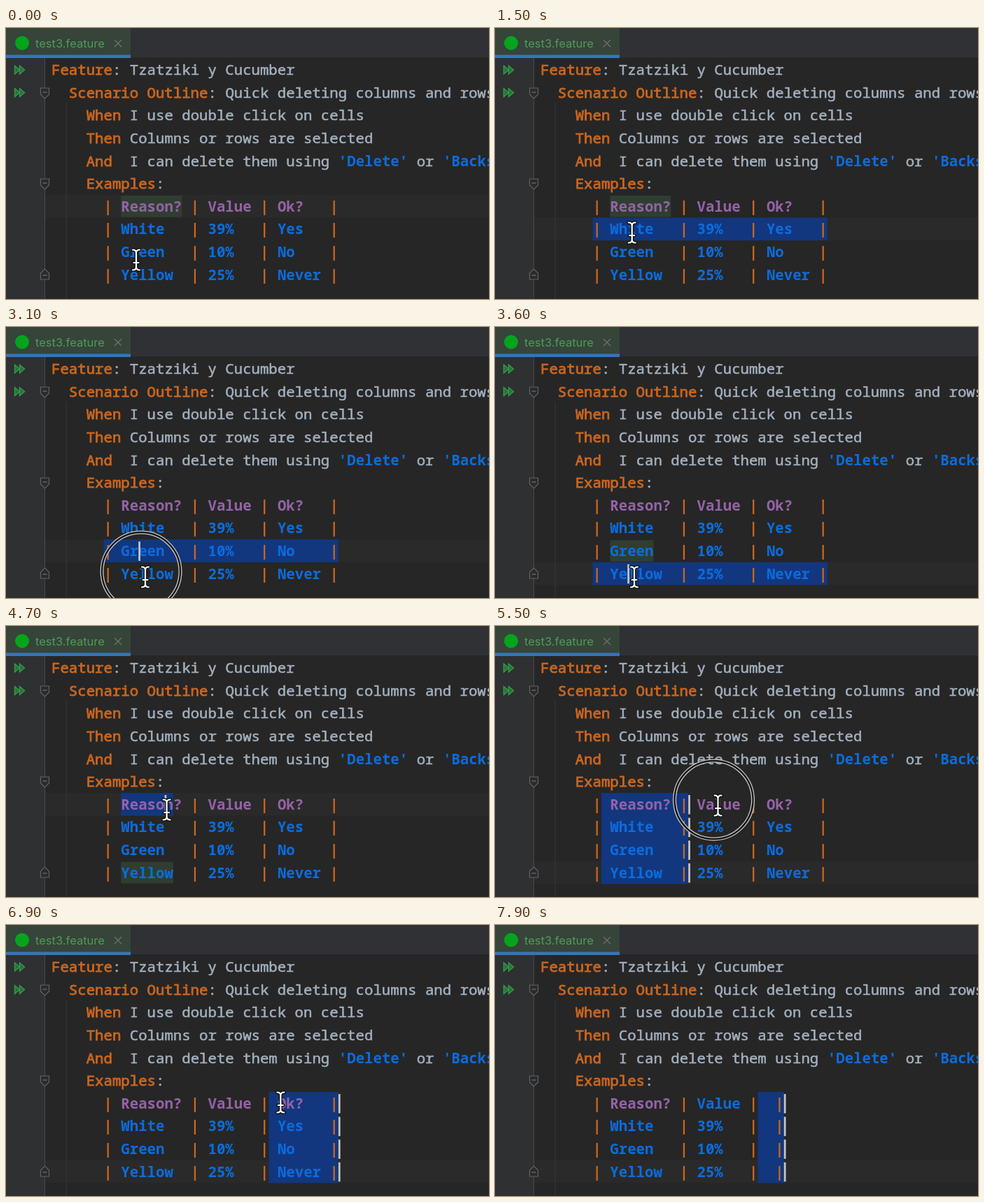
Write an HTML page that moves like this. It is 690 by 388 pixels and loops after 8 s.

```html
<!DOCTYPE html>
<html lang="en">
<head>
<meta charset="utf-8">
<title>Editor table columns</title>
<style>
html, body { margin: 0; width: 100%; height: 100%; overflow: hidden; background: #262626; }
svg { display: block; }
text { font: 500 20.7px "Noto Sans Mono", "DejaVu Sans Mono", monospace; white-space: pre; }
/* A thin outline stands in for the medium weights. */
.medium { stroke: currentColor; stroke-width: .55; }
.key { stroke: currentColor; stroke-width: .85; }
.bold { font-weight: 700; }
.tab { font: 400 16.5px Inter, "Open Sans", sans-serif; }
</style>
</head>
<body>
<svg id="stage" width="690" height="388" viewBox="0 0 690 388"></svg>
<script>
const stage = document.getElementById("stage");
const KEY = "#ca661f", TEXT = "#a3b0be", BLUE = "#0c6cdc", PURPLE = "#9463a6";
const CHAR = 12.42, LINE = 32.6, TABLE_TOP = 239;
const colX = c => 65 + c * CHAR;
const rowY = r => TABLE_TOP + r * LINE;

function add(parent, name, attrs = {}, content) {
  const el = document.createElementNS("http://www.w3.org/2000/svg", name);
  for (const k in attrs) el.setAttribute(k, attrs[k]);
  if (content !== undefined) el.textContent = content;
  parent.append(el);
  return el;
}
const rect = (parent, x, y, width, height, fill) => add(parent, "rect", { x, y, width, height, fill });
const path = (parent, d, attrs) => add(parent, "path", { d, fill: "none", ...attrs });
// Lines count from the top of the file; the table starts at line 6.
const word = (line, col, s, color, cls = "medium") => add(stage, "text",
  { x: colX(col), y: 67.2 + line * LINE, color, fill: "currentColor", class: cls }, s);

// Editor background, gutter and tab bar
rect(stage, 0, 0, 690, 388, "#262626");
rect(stage, 0, 43, 55, 345, "#2e3032");
const back = add(stage, "g");
rect(stage, 0, 0, 690, 42, "#2f3135");
rect(stage, 0, 0, 178, 39, "#36443a");
rect(stage, 0, 38.5, 178, 4.5, "#3676b8");
add(stage, "circle", { cx: 23, cy: 21.5, r: 10, fill: "#04a51c" });
add(stage, "text", { x: 42, y: 27.5, fill: "#4f9a58", class: "tab" }, "test3.feature");
path(stage, "M155 17l10 10m0-10l-10 10", { stroke: "#6b706d", "stroke-width": 1.4 });
path(stage, "M55.5 43V388", { stroke: "#484a4b" });
path(stage, "M86 107V388", { stroke: "#363636" });

for (const y of [60, 92.5])
  path(stage, `M12.5 ${y - 6}l7 6l-7 6zM19.5 ${y - 6}l7 6l-7 6z`,
    { stroke: "#35994a", "stroke-width": 1.4, fill: "#2a7039" });
for (const [y, dir] of [[93, 1], [223, 1], [353, -1]]) {
  path(stage, `M49.5 ${y - 7 * dir}h12v${9 * dir}l-6 ${6 * dir}l-6 ${-6 * dir}z`,
    { stroke: "#606263", "stroke-width": 1.2, fill: "#2a2b2c" });
  path(stage, `M52.5 ${y - dir}h6`, { stroke: "#707273", "stroke-width": 1.2 });
}

// Feature file
[[0, 0, "Feature", ":"], [1, 2, "Scenario Outline", ":"], [2, 4, "When"], [3, 4, "Then"],
 [4, 4, "And"], [5, 4, "Examples", ":"]].forEach(([line, col, s, colon]) => {
  word(line, col, s, KEY, "key");
  if (colon) word(line, col + s.length, colon, TEXT);
});
word(0, 9, "Tzatziki y Cucumber", TEXT);
word(1, 20, "Quick deleting columns and rows", TEXT);
word(2, 9, "I use double click on cells", TEXT);
word(3, 9, "Columns or rows are selected", TEXT);
word(4, 9, "I can delete them using", TEXT);
word(4, 33, "'Delete'", BLUE, "bold");
word(4, 42, "or", TEXT);
word(4, 45, "'Backspace'", BLUE, "bold");

const cells = ["Reason? Value Ok?", "White 39% Yes", "Green 10% No", "Yellow 25% Never"].map((row, r) =>
  row.split(" ").map((s, c) => word(6 + r, [8, 18, 26][c], s, r ? BLUE : PURPLE, "bold")));
const pipes = cells.map((_, r) => [6, 16, 24, 32].map(c => word(6 + r, c, "|", KEY, "bold")));

const front = add(stage, "g");
const ring = add(stage, "g");
add(ring, "circle", { r: 56, fill: "none", stroke: "#c9c9c9", "stroke-width": 5 });
add(ring, "circle", { r: 56, fill: "none", stroke: "#161616", "stroke-width": 2.4 });
const mouse = add(stage, "g");
const beam = "M-5-14.5Q0-14.5 0-10Q0-14.5 5-14.5M0-10V10M-5 14.5Q0 14.5 0 10Q0 14.5 5 14.5M-3.5 4H3.5";
path(mouse, beam, { stroke: "#111", "stroke-width": 5, "stroke-linecap": "round" });
path(mouse, beam, { stroke: "#fff", "stroke-width": 2.2, "stroke-linecap": "round" });

// at: start time, line: caret row, sel: [col, end col, row, rows],
// hl: [row, length] of the marked word, carets: [col, row, rows]
const column = (from, to) => ({ line: 3, sel: [from, to, 0, 4], carets: [to, 0, 4] });
const fullRow = r => ({ line: r, sel: [6, 33, r, 1] });
const states = [
  { at: 0, line: 0, hl: [0, 7] },
  { at: 1200, ...fullRow(1), hl: [0, 7] },
  { at: 1900, ...fullRow(1) },
  { at: 2400, ...fullRow(2), carets: [10, 2, 1] },
  { at: 3200, ...fullRow(3), hl: [2, 5], carets: [10, 3, 1] },
  { at: 4400, line: 0, hl: [3, 6], carets: [13, 0, 1] },
  { at: 4600, line: 0, hl: [3, 6], sel: [8, 14, 0, 1], carets: [13, 0, 1] },
  { at: 4800, ...column(7, 17) },
  { at: 5600, ...column(17, 25) },
  { at: 6900, ...column(25, 33) },
  { at: 7600, ...column(25, 28), deleted: true }
];
const clicks = [[900, 1200], [2150, 2450], [2950, 3250], [4300, 4600], [5350, 5650], [6600, 6900]];
const moves = [[0, 186, 332], [800, 195, 293], [1900, 196, 293], [2200, 197, 325], [2700, 197, 326],
  [3100, 199, 358], [3800, 199, 358], [4400, 229, 263], [4900, 230, 263], [5350, 318, 257],
  [5800, 320, 257], [6200, 392, 254], [8000, 393, 254]];

function mouseAt(t) {
  const i = moves.findIndex(m => m[0] > t);
  const [t0, x0, y0] = moves[i - 1], [t1, x1, y1] = moves[i];
  const p = (t - t0) / (t1 - t0), e = p * p * (3 - 2 * p);
  return [x0 + (x1 - x0) * e, y0 + (y1 - y0) * e];
}

function showState({ line, sel, hl, carets, deleted }) {
  back.replaceChildren();
  front.replaceChildren();
  rect(back, 56, rowY(line), 634, LINE, "#2a2a2a");
  if (hl) rect(back, colX(8), rowY(hl[0]) + 1, hl[1] * CHAR, LINE - 2, "#2f3e31");
  if (sel) {
    const [from, to, row, rows] = sel;
    rect(back, colX(from), rowY(row), (to - from) * CHAR, rows * LINE, "#12377f");
  }
  if (carets) {
    const [col, row, rows] = carets;
    for (let r = row; r < row + rows; r++) rect(front, colX(col), rowY(r) + 3, 2.8, LINE - 5, "#c4c4c4");
  }
  cells.forEach((row, r) => {
    row[2].style.display = deleted ? "none" : "";
    pipes[r][3].setAttribute("x", colX(deleted ? 27 : 32));
  });
  cells[0][1].setAttribute("color", deleted ? BLUE : PURPLE);
  mouse.style.display = deleted ? "none" : "";
}

let shown;
function draw(now) {
  const t = Math.floor(now % 8000 / 100) * 100;
  const state = states.findLast(s => s.at <= t);
  if (state !== shown) showState(shown = state);
  const [x, y] = mouseAt(t);
  mouse.setAttribute("transform", `translate(${x} ${y})`);
  ring.setAttribute("transform", `translate(${x - 6} ${y - 8})`);
  ring.style.display = clicks.some(([a, b]) => t >= a && t < b) ? "" : "none";
  requestAnimationFrame(draw);
}
draw(performance.now());
</script>
</body>
</html>
```
